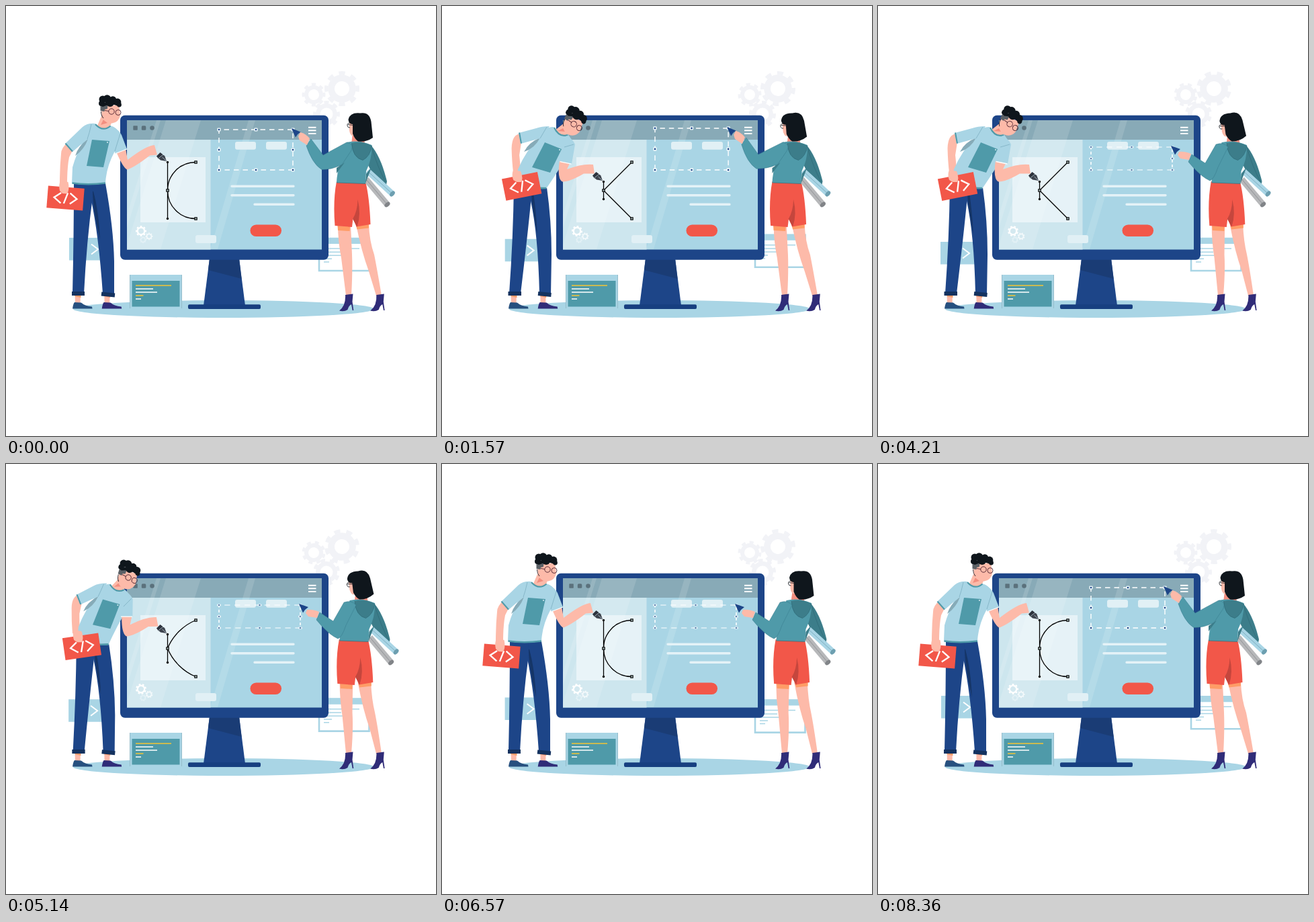
Animation of 640 by 640 pixels, one loop 8430 ms. Source, as an HTML page:

```html
<!DOCTYPE html>
<html lang="en">
<head>
<meta charset="utf-8">
<title>Design team at work</title>
<style>
html, body { margin: 0; width: 100%; height: 100%; overflow: hidden; background: #fff; }
svg { display: block; width: 100vw; height: 100vh; }
</style>
</head>
<body>
<svg viewBox="0 0 640 640" fill="none">
  <defs><clipPath id="screen"><path d="M180 170H470V362.500H180Z"/></clipPath></defs>
  <g id="back"></g>
  <ellipse cx="324" cy="451" rx="224" ry="13" fill="#a9d5e5"/>

  <path d="M184 400H262V450H184Z" fill="#a9d5e5"/>
  <path d="M184.500 400V450M261.500 400V450" stroke="#86abb8" stroke-width=".6"/>
  <path d="M187.500 409H258.500V447.500H187.500Z" fill="#4f9aa9"/>
  <path d="M193 416H246M193 431H204.500" stroke="#f4c534" stroke-width="1.700"/>
  <path d="M193 421H219M193 426H225M193 436H201" stroke="#fff" stroke-width="1.700"/>

  <path d="M303 376H347L356 446H294Z" fill="#1d4588"/>
  <path d="M303 376H347L350.500 406L301 393Z" fill="#1a3c75"/>
  <rect x="271" y="444.300" width="108" height="6.700" rx="2" fill="#173f80"/>
  <rect x="170" y="162.700" width="310" height="215" rx="7" fill="#1d4588"/>
  <g clip-path="url(#screen)">
    <path d="M180 170H470V363H180Z" fill="#a9d5e5"/>
    <path d="M180 199H304.500V363H180Z" fill="#cde6ee"/>
    <path d="M180 170H470V199H180Z" fill="#88aab7"/>
    <path d="M200 225H297V322H200Z" fill="#e6f2f7"/>
    <g fill="#fff" opacity=".13">
      <path d="M224 170H230L170 362H164ZM238 170H290L230 362H178ZM361 170H371L315 362H304Z"/>
    </g>
  </g>
  <g fill="#5b717c">
    <rect x="189.300" y="178.300" width="6.500" height="6.500" rx=".8"/>
    <rect x="201.800" y="178.300" width="6.500" height="6.500" rx="1.600"/>
    <circle cx="217.500" cy="181.500" r="3.300"/>
  </g>
  <path d="M450 180.800H461.500M450 185.300H461.500M450 189.900H461.500" stroke="#fff" stroke-width="1.900"/>
  <g fill="#e1f0f5">
    <rect x="341" y="202" width="31" height="11.800" rx="3"/>
    <rect x="387" y="202" width="31" height="11.800" rx="3"/>
    <rect x="282" y="341" width="31" height="12" rx="3"/>
  </g>
  <path d="M336 268.200H428M336 281.800H428M370 295.200H428" stroke="#e4f2f7" stroke-width="3.400" stroke-linecap="round"/>
  <rect x="363.500" y="325.500" width="46.500" height="17.500" rx="8.750" fill="#f25749"/>
  <g id="front"></g>
</svg>

<script>
const LOOP = 8430;
const SKIN = '#fdbaa9', BLUE = '#a9d5e5', NAVY = '#1d4588', TEAL = '#4f9aa9',
      DEEP = '#3c7d8a', RED = '#f25749', INK = '#0f161c', VIOLET = '#302c78';
const NUM = /-?\d+(\.\d+)?/g;
const $ = id => document.getElementById(id);
const lerp = (a, b, k) => a + (b - a) * k;

// Blend two paths that have the same commands.
function mix(a, b, k) {
  const end = b.match(NUM);
  let i = 0;
  return a.replace(NUM, v => lerp(+v, +end[i++], k).toFixed(2));
}

// Eased keyframes: [time, value] pairs.
function key(t, keys) {
  let i = 0;
  while (i < keys.length - 2 && keys[i + 1][0] < t) i++;
  const [t0, a] = keys[i], [t1, b] = keys[i + 1];
  const u = Math.min(1, (t - t0) / (t1 - t0));
  return lerp(a, b, u < .5 ? 2 * u * u : 1 - 2 * (1 - u) ** 2);
}

const fill = (c, d) => `<path d="${d}" fill="${c}"/>`;
const line = (c, w, d, more = '') => `<path d="${d}" stroke="${c}" stroke-width="${w}" ${more}/>`;
const group = (tf, s) => `<g transform="${tf}">${s}</g>`;
const ROUND = 'stroke-linecap="round" stroke-linejoin="round"';

function gear(x, y, r, hole, color, turn, teeth = 8) {
  const rim = r * .8, ring = (q, w, more) =>
    `<circle r="${q}" stroke="${color}" stroke-width="${w}" ${more}/>`;
  return group(`translate(${x} ${y}) rotate(${turn - 90 - 90 / teeth})`,
    ring((rim + hole) / 2, rim - hole, '') +
    ring((rim + r) / 2 - .2, r - rim + .4, `pathLength="${2 * teeth}" stroke-dasharray="1 1"`));
}

function drawBack(t) {
  const a = 2 * Math.PI * t / LOOP, turn = 45 * t / LOOP, pale = '#f2f3f7';
  return gear(500, 123, 26, 11, pale, turn) +
    gear(458, 132, 17.5, 8, pale, -turn) +
    gear(477, 161, 20, 9.500, pale, turn) +
    group(`translate(${-.5 + .5 * Math.cos(a)} ${3 - 3 * Math.cos(a)})`,
      fill(BLUE, 'M94 345H152V378.500H94Z') +
      line('#fff', 2, 'M127 354.500L137 362L127 369.500')) +
    group(`translate(0 ${-5.700 * Math.sin(a)})`,
      fill('#fff', 'M466 346H541V394H466Z') +
      line(BLUE, 2.600, 'M466 346H540.500V394H466Z') +
      fill(BLUE, 'M465 345H541.500V354H465Z') +
      line(BLUE, 1.500, 'M473 361H526M473 366.300H499M473 371.300H511M473 376.300H485M473 381H481'));
}

function drawCurve(h) {
  const reach = lerp(42, 13, h), top = 274.500 - reach, bottom = 274.500 + reach;
  const box = (x, y) => `<path d="M${x - 1.700} ${y - 1.700}h3.400v3.400h-3.400Z" fill="#9aa" stroke="#000" stroke-width="1.100"/>`;
  const arc = mix('M282.5 232.5 C259 232.5 240.5 251 240.5 274.5 C240.5 298 259 316.5 282.5 316.5',
    'M282.5 232.5 C268.5 246.5 254.5 260.5 240.5 274.5 C254.5 288.5 268.5 302.5 282.5 316.5', h * h);
  return line('#000', 1.300, arc) + line('#000', 1.300, `M240.500 ${top}V${bottom}`) +
    `<g fill="#000"><circle cx="240.500" cy="${top}" r="1.700"/><circle cx="240.500" cy="${bottom}" r="1.700"/></g>` +
    box(282.5, 232.5) + box(282.5, 316.5) + box(240.5, 274.5);
}

function drawSelection(w) {
  const sx = (110 + 11 * w) / 110, sy = (60 - 26 * w) / 60;
  let s = line('#fff', 1.400, 'M0 0V-60H110V0Z', 'stroke-dasharray="7.500 6"');
  for (const x of [0, 55, 110]) for (const y of [0, -30, -60]) {
    if (x === 55 && y === -30) continue;
    s += `<rect x="${x - 2.600}" y="${y - 2.600}" width="5.200" height="5.200" rx="1" fill="#eaf5f9"/>` +
      `<circle cx="${x}" cy="${y}" r="1.300" fill="${NAVY}"/>`;
  }
  return group(`translate(317 244) scale(${sx} ${sy})`, s);
}

function shoe(x, color) {
  return group(`translate(${x} 0)`,
    fill(SKIN, 'M102.500 429H111L110.500 443H103Z') +
    fill('#ff9c66', 'M102.500 429H111.500V434L102.500 432Z') +
    fill(color, 'M99 450.500Q100 443 102 441L112 441.500Q117 446.500 128 447.500L128.500 450.500Z') +
    line('#fff', .700, 'M112 442L115 438.500L117 441'));
}

function manHead(m) {
  const hair = [[144, 139, 5.5], [150.500, 138, 5.800], [159, 139.500, 5.200], [166, 143, 5.400],
    [142, 145, 4], [155, 144, 6], [168.500, 147, 3.400]];
  return group(`translate(${lerp(155, 195.200, m)} ${lerp(155, 173, m)}) rotate(${27 * m}) translate(-155 -155)`,
    fill(SKIN, 'M142 150L168 147L170 163Q168 173 158 174.500Q148 175 143 166Z') +
    fill('#5a6066', 'M140.500 147L151.500 146L151 153L147 154L146.500 157L140.500 156Z') +
    line('#3c2f35', 1, 'M141.500 157Q141.500 163 145 167') +
    fill(INK, 'M139 147Q152 139 171 144L170 150Q163 146 152 147L144 150Z') +
    hair.map(([x, y, r]) => `<circle cx="${x}" cy="${y}" r="${r}" fill="${INK}"/>`).join('') +
    `<g stroke="#4b2430" stroke-width=".900"><circle cx="157" cy="157" r="4.200"/>` +
    `<circle cx="167" cy="158.500" r="4"/><path d="M147 155.500L153 156.500"/></g>`);
}

function drawMan(m, a, h) {
  const mid = (m + a) / 2;
  const pose = (p, q) => mix(p, q, m);
  const body = pose('M133 176 Q122 178 119 192 Q104 221 99 240 L98 264 Q122 268 148 264 Q149 240 162 216 L170 190 Q164 180 155 178 Q145 188 133 176Z',
    'M166 180 Q150 180 145 195 Q125 215 113 243 L110 264 Q130 272 155 272 Q170 250 183 229 L196 206 Q192 196 187 191 Q178 198 166 180Z');
  const sleeveL = pose('M133 175 Q121 174 114 180 L88 205 L99 217 L121 198Z',
    'M160 179 Q148 179 140 182 L114 189 L117 205 L146 197Z');
  const sleeveR = pose('M160 180 Q169 186 172 192 L180 213 L163 220 L160 214Z',
    'M185 193 Q194 197 198 206 L193 235 L175 231 L184 208Z');
  return shoe(0, '#27507f') + shoe(43.700, VIOLET) +
    fill(NAVY, pose('M126 262 L148 264 Q160 330 161 380 L161 431 L144 428 Q138 340 126 285Z',
      'M131 262 L156 270 Q163 320 163 370 L162 430 L145 428 Q143 340 132 290Z')) +
    fill('#153567', pose('M129 276 Q129 300 140 348 Q138 305 130 276Z', 'M133 278 Q134 300 142 340 Q140 305 136 278Z')) +
    fill(NAVY, pose('M101 262 Q101 340 99 428 L116 428 Q120 350 129 284 L128 262Z',
      'M107 265 Q106 345 100 428 L117 428 Q127 345 133 284 L134 265Z')) +
    line('#14325f', 6, pose('M98 428 L117 428', 'M98.5 428 L118 428')) +
    line('#14325f', 6, pose('M142 428.5 L162 430.5', 'M143 428 L162.5 430')) +
    fill(SKIN, pose('M142 164 L136 178 Q145 187 155 179 L158 171Z', 'M182 174 L168 185 Q176 198 187 192 L190 186Z')) +
    fill('#f28f80', pose('M145 169 L141 177 L151 174Z', 'M180 182 L172 186 L184 187Z')) +
    fill(SKIN, mix('M92 203 Q82 211 82 220 Q80 240 80 264 L91 264 Q91 240 94 225 L100 213Z',
      'M118 190 Q104 190 103.5 212 Q104 232 106 248 L117 248 Q116 230 115 222 L118 203Z', mid)) +
    fill(BLUE, body) +
    fill('#86abb8', pose('M122 198 Q107 209 103 223 Q116 214 122 198Z', 'M146 196 Q129 203 122 217 Q138 212 146 196Z')) +
    line(TEAL, 2.600, pose('M98.5 263.5 Q122 267 148 263.5', 'M110 264 Q130 272 155 271')) +
    fill(BLUE, sleeveL) +
    line('#6fa3b5', .600, pose('M127 176 Q124 190 121 198', 'M156 180 Q150 190 146 197')) +
    line(TEAL, 2, pose('M88.5 204.5 L99 216.500', 'M115 188.5 L118 204.500')) +
    fill(TEAL, pose('M128 199 L154 201 L145 240 L120 238Z', 'M153 203 L178 213 L161 248 L134 240Z')) +
    `<circle cx="${lerp(151, 175, m)}" cy="${lerp(203, 214, m)}" r="1" fill="#d8edf3"/>` +
    line(TEAL, 2.200, pose('M133 176 Q144 188 155.5 178.500', 'M167 181 Q174 196 187 192')) +
    fill(SKIN, mix('M165 219 Q174 240 180 243.5 Q190 241 214 222.5 L225 221.5 L221 207 Q208 208 181 229 L178 212Z',
      'M175 230 Q171 257 179 261.5 Q190 262 211 249.5 L227 249.5 L225 236 Q210 234 186 243 L191 232Z', h)) +
    fill(BLUE, sleeveR) +
    line('#6fa3b5', .600, pose('M170 190 L162 216', 'M196 206 L182 210')) +
    line('#fff', 1.300, pose('M163 219.5 L180 213', 'M175.500 231.5 L192.500 235')) +
    manHead(m) +
    group(`translate(${lerp(88.500, 118.500, a)} ${lerp(286, 268.500, a)}) rotate(${lerp(4.500, -11.200, a)})`,
      fill(RED, 'M-27 -16.500H27V16.500H-27Z') +
      line('#fff', 2.300, 'M-7 -7.500L-17 0L-6.500 8M3 -8L-2 8M6.500 -8L17 0L7 8')) +
    fill(SKIN, mix('M81 260 Q78 266 80 275 L84 279 L91 279.5 Q95 273 92.5 262Z',
      'M106 244 Q103 251 106 259 L111 262 L118 262 Q121 256 117 246Z', a)) +
    group(`translate(239 ${lerp(231, 260, h)})`,
      fill('#3d434d', 'M0 0L-2.800 -8L-7 -10.500L-13 -5L-9 -1.500Z') +
      fill('#2c323c', 'M-9.500 -13L-5 -9.500L-12 -3.500L-15 -7.500Z') +
      line('#cfe3ec', .700, 'M-1 -1L-6.500 -6M-5 -10L-12.500 -4'));
}

function boot(x) {
  return group(`translate(${x} 0)`,
    fill(VIOLET, 'M505 430L516.500 428.500L515.500 440L517.300 453H515.700L514 444Q510 446 508.500 452Q503 455.500 496 453.500Q506 446 505 430Z'));
}

function roll(x1, y1, x2, y2, color, cap) {
  const turn = Math.atan2(y2 - y1, x2 - x1) * 180 / Math.PI;
  return line(color, 9, `M${x1} ${y1}L${x2} ${y2}`) +
    line(cap, .700, `M${x1} ${y1}L${x2} ${y2}`) +
    `<ellipse rx="3" ry="4.600" fill="${cap}" transform="translate(${x2} ${y2}) rotate(${turn})"/>`;
}

function drawWoman(d, w, headX, headTurn) {
  const k = d / 8.500, hip = .85 * d;
  const legs = fill(SKIN, mix('M494 325 Q494 350 499 375 L506 431 L514 431 Q516 395 515 370 L513 325Z',
      'M499 325 Q499 350 502 375 L506 431 L514 431 Q518 395 516 370 L519 325Z', k)) +
    fill(SKIN, mix('M521 325 Q529 365 540 395 L551 431 L559 431 Q552 390 548 370 Q541 350 540 325Z',
      'M526 325 Q533 365 543 395 L551 431 L559 431 Q554 390 550 370 Q547 350 546 325Z', k));
  const shorts = group(`translate(${hip} 0)`,
    fill('#ff9c66', 'M493.500 327L512 328L511.500 335L494 334ZM521 327L540 324V330.500L522.500 332.500Z') +
    fill(RED, 'M492 261Q486.500 290 489.500 327L515 329L516.500 316L521.500 328.500L542.500 325Q541 285 535 261Z') +
    fill('#c5463d', 'M523.500 288Q523 306 516 317L522.500 328.500Q529 310 523.500 288Z'));
  const torso = group(`translate(${d} 0)`,
    fill(DEEP, 'M543 207Q558 224 567 261L566 266Q553 260 544 247L538 235Z') +
    line('#2c6572', .600, 'M545 212Q553 240 565 262') +
    group(`translate(${.25 * d} 0)`,
      roll(536, 258, 567.500, 295.500, '#b7b8ba', '#818488') +
      roll(538, 245.500, 575, 279.500, BLUE, '#6d9fb0')) +
    fill('#f28f80', 'M516 190L533 196L534 206L514 205Z') +
    fill(TEAL, 'M507 203Q526 198.500 544.500 207Q545 228 536 246L535 264.500L492 263Q493 240 502 225Z') +
    fill(DEEP, 'M504 233L492 241V249ZM536 250L544 240L535 264Z') +
    fill(DEEP, 'M514.500 204Q530 200 544.500 208Q542 224 531 229.500Q516 226 514.500 204Z') +
    line('#2c6572', .600, 'M514.500 204Q516 226 531 229.500Q542 224 544.500 208M492 263L535 264.500'));
  const sleeve = mix('M454 198 L472 222 L507 203 Q518 205 514 215 L500 236 Q486 243.500 470 243.500 Q456 235 447 208Z',
    'M467 221 L487 234 L503 206 Q514 202 521 210 L506 240 Q500 258 494 260 Q480 254 462 232Z', w);
  const head = group(`translate(${headX} 0) rotate(${headTurn} 525 198)`,
    fill(SKIN, 'M511 171L520 170V194L514 192.500Q510.500 188 511 182Z') +
    fill(INK, 'M509.500 169Q512 158 527 159.500Q541 157 543.500 172L546 196Q536 203 524 201.500Q519 198 516 190V176Q510 176 509.500 169Z') +
    line('#23262c', .900, 'M512 174Q507.500 174.500 508 178Q508.500 181.500 512 181M509 176.500L517 177.500'));
  return legs + boot(0) + boot(46.300) + shorts + torso +
    fill(TEAL, sleeve) + line('#37798a', .500, sleeve) +
    fill(NAVY, mix('M425 182 L438.500 187.5 L434 191 L431 195.500Z', 'M436 208 L450 213 L445 217 L442 221.500Z', w)) +
    fill(SKIN, mix('M452 197 Q446 190 438 188 L435 194 L437 200 L448 207Z',
      'M466 220 Q456 216 448 217 L446 222 L450 227 L463 229Z', w)) +
    head;
}

function frame(now) {
  const t = now % LOOP;
  const lean = key(t, [[0, 0], [1400, 1], [2900, 1.06], [4300, 1], [4400, 1], [6150, 0], [LOOP, 0]]);
  const card = key(t, [[0, 0], [1400, 1], [2900, 1.22], [4300, 1], [4500, 1], [6600, 0], [7300, -.03], [LOOP, 0]]);
  const pen = key(t, [[0, 0], [1400, 1], [4400, 1], [6400, 0], [LOOP, 0]]);
  const reach = key(t, [[0, 0], [1570, -.08], [2500, 1], [6700, 1], [8200, 0], [LOOP, 0]]);
  const sway = key(t, [[0, 0], [1570, -.5], [2700, 9], [4210, 4.500], [5790, 4.500], [6700, 5.500], [8200, 0], [LOOP, 0]]);
  const headX = key(t, [[0, 0], [1570, -2.700], [2700, 9.500], [4210, 2.500], [5790, 1.500], [6570, 7.500], [8200, 0], [LOOP, 0]]);
  const headTurn = key(t, [[0, 0], [1570, -4], [2700, -8], [5790, -7], [6570, 0], [LOOP, 0]]);
  const turn = 45 * t / LOOP;

  $('back').innerHTML = drawBack(t);
  $('front').innerHTML =
    gear(201, 335, 8, 4, '#fff', turn) + gear(213, 342.800, 5.500, 2.600, '#f3f9fb', -turn) +
    gear(204, 348, 5, 2.400, '#e3f1f6', turn) +
    drawCurve(pen) + drawSelection(reach) + drawMan(lean, card, pen) +
    drawWoman(sway, reach, headX, headTurn);
  requestAnimationFrame(frame);
}
frame(performance.now());
</script>
</body>
</html>
```
